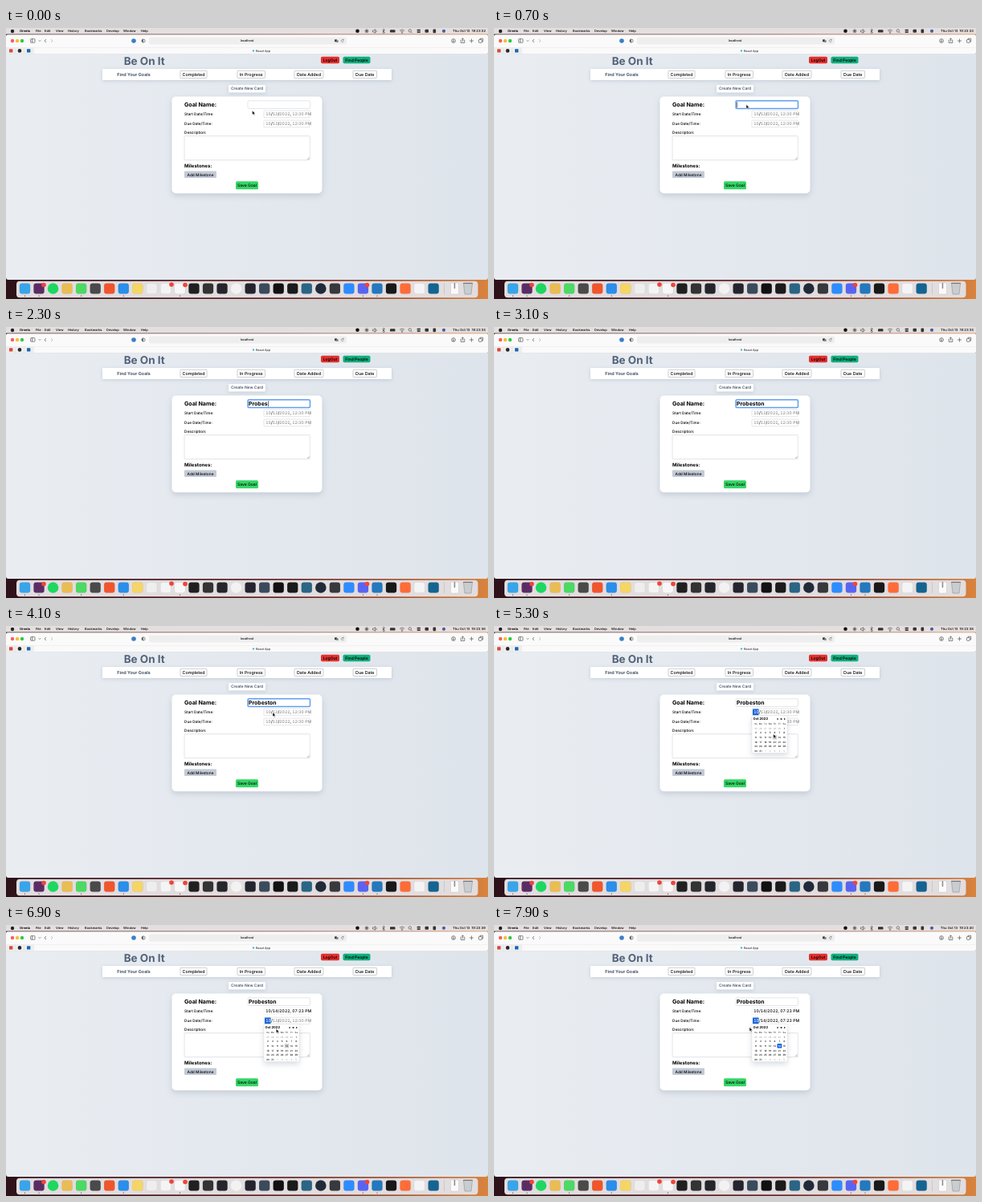
Animation, 600 px wide and 338 px high, one loop 8000 ms. Source, as an HTML page:

```html
<!DOCTYPE html>
<html lang="en">
<head>
<meta charset="utf-8">
<title>Goal form</title>
<style>
  html, body { margin: 0; width: 100%; height: 100%; overflow: hidden; background: #fff; }
  svg { display: block; width: 100vw; height: 100vh; }
  text { font-family: Inter, "Liberation Sans", sans-serif; font-weight: 500; text-rendering: geometricPrecision; white-space: pre; }
  .b { font-weight: 700; }
  .s { font-weight: 600; }
  .c { text-anchor: middle; }
  .e { text-anchor: end; }
  .date { font-feature-settings: "tnum"; }
  .line { fill: none; stroke: #555; stroke-width: .7; }
  .soft { filter: drop-shadow(0 1.5px 2px #64748b40); }
  .card { filter: drop-shadow(0 3px 3.5px #64748b40); }
</style>
</head>
<body>
<svg id="stage" viewBox="0 0 600 338">
  <defs>
    <linearGradient id="sky">
      <stop offset="0" stop-color="#e9edf2"/>
      <stop offset="1" stop-color="#dee4eb"/>
    </linearGradient>
    <linearGradient id="desk">
      <stop offset="0" stop-color="#2d1119"/>
      <stop offset=".6" stop-color="#6d2a2c"/>
      <stop offset="1" stop-color="#d9833f"/>
    </linearGradient>
  </defs>
  <rect width="600" height="338" fill="url(#desk)"/>
  <path d="M0 32H600V311Q600 314 597 314H3Q0 314 0 311Z" fill="url(#sky)"/>
  <g id="chrome"></g>
  <g id="page"></g>
  <g id="dock"></g>

  <g id="nameField">
    <rect id="nameBox" x="301" y="90.8" width="77.5" height="9.7" rx="1.5" fill="#fff"/>
    <text id="nameText" class="b" x="302" y="98.3" font-size="6.9"></text>
    <rect id="caret" y="92.3" width=".6" height="7" fill="#111"/>
  </g>
  <g id="dates"></g>
  <g id="calendar" class="card"></g>
  <path id="cursor" d="M0 0V5.2L1.3 4.1L2.1 6L3 5.6L2.2 3.8H3.8Z" fill="#000" stroke="#fff" stroke-width=".5" stroke-linejoin="round"/>
</svg>
<script>
const $ = id => document.getElementById(id);
const LOOP = 8000, NAME = 'Probeston';

const text = (x, y, size, str, cls = '', fill = '#000') =>
  `<text x="${x}" y="${y}" font-size="${size}" class="${cls}" fill="${fill}">${str}</text>`;
const rect = (x, y, w, h, fill, rx = 0, more = '') =>
  `<rect x="${x}" y="${y}" width="${w}" height="${h}" fill="${fill}" rx="${rx}" ${more}/>`;
const dot = (x, y, r, fill) => `<circle cx="${x}" cy="${y}" r="${r}" fill="${fill}"/>`;
const line = (d, more = '') => `<path class="line" d="${d}" ${more}/>`;
const frame = (x, y, w, h, color = '#d3d6db') =>
  rect(x, y, w, h, '#fff', .8, `stroke="${color}" stroke-width=".6"`);

function drawChrome() {
  const menus = [['File', 37], ['Edit', 48], ['View', 62], ['History', 77], ['Bookmarks', 98],
    ['Develop', 125], ['Window', 146], ['Help', 168]];
  let out = rect(0, 0, 600, 7.6, '#e4dfdf') + dot(8, 4, 2.2, '#222') + text(17, 5.3, 4, 'Orvela', 'b');
  out += menus.map(([label, x]) => text(x, 5.3, 4, label)).join('');
  // status icons
  out += dot(437.5, 3.8, 2.3, '#111');
  out += '<circle cx="449" cy="3.8" r="2" class="line"/>' + dot(449, 3.8, 1, '#222');
  out += line('M456.5 3H457.5L459.5 1.8V6.2L457.5 5H456.5ZM460.7 2.5Q462.2 4 460.7 5.5');
  out += line('M468.5 2.5L471.5 5.5L470 7V1L471.5 2.5L468.5 5.5') + rect(478, 2.2, 6.5, 3.4, '#333', .9);
  out += line('M490 3.2Q493 .8 496 3.2M491.3 4.6Q493 3.2 494.7 4.6') + dot(493, 6, .7, '#222');
  out += '<circle cx="502.8" cy="3.4" r="1.7" class="line"/>' + line('M504.1 4.8L505.5 6.3');
  out += rect(511.5, 1.8, 4.5, 1.7, '#333', .8) + rect(511.5, 4.2, 4.5, 1.7, '#333', .8);
  out += rect(521.5, 1.8, 4.5, 4, '#333', 1) + rect(531.5, 1.6, 3.6, 4.6, '#333', 1) + dot(545, 3.8, 2.1, '#4b5f9a');
  out += '<text id="clock" class="e" x="597" y="5.3" font-size="4.2"></text>';
  // toolbar
  out += rect(0, 8.2, 600, 24, '#fbfafa', 2);
  out += ['#f65f57', '#f8bd32', '#2fc944'].map((c, i) => dot(8 + 6 * i, 16, 2.2, c)).join('');
  out += '<rect x="30.5" y="13.6" width="5.5" height="4.6" rx=".8" class="line"/>' + line('M32.5 13.6V18.2');
  out += line('M40.8 15.3L42 16.5L43.2 15.3M50 14L48 16L50 18') + line('M56 14L58 16L56 18', 'opacity=".45"');
  out += dot(159, 16, 2.8, '#397fc8') + '<circle cx="171" cy="16" r="2.1" class="line"/><path d="M171 13.9A2.1 2.1 0 0 0 171 18.1Z" fill="#666"/>';
  out += rect(178, 11.5, 246, 9, '#efeeee', 2) + text(300, 17.4, 3.8, 'localhost', 'c');
  out += rect(409, 14.2, 3, 3, '#444', .5) + rect(411, 15.2, 2.6, 2.6, '#777', .5);
  out += line('M420 15A1.5 1.5 0 1 0 420.3 16.6M420.2 13.8V15.2H419', 'style="stroke-width:.5"');
  out += '<circle cx="557" cy="16" r="2.4" class="line"/>' + line('M557 14.4V17.4M555.9 16.3L557 17.4L558.1 16.3');
  out += line('M567.3 15H566.2V18.5H570.8V15H569.7M568.5 17V12.8L567.3 14M568.5 12.8L569.7 14');
  out += line('M579.5 13.5V18.5M577 16H582');
  out += '<rect x="588.5" y="14.5" width="3.8" height="3.8" rx=".6" class="line"/>' + line('M590 14.2V13.2H593.7V17H592.5');
  // tabs
  out += rect(0, 24.5, 34, 7.7, '#efeeee') + rect(0, 24.3, 600, .4, '#e2e1e1') + rect(0, 32, 600, .4, '#d9d9db');
  out += [11, 22.5, 34].map(x => rect(x, 24.5, .4, 7.7, '#dbdada')).join('');
  out += rect(4, 26.2, 4.4, 4.4, '#d94b3d', .5) + dot(17, 28.4, 2.3, '#25282c') + rect(26, 26.2, 4.4, 4.4, '#1769b5', .5);
  out += dot(308, 28.4, 1.2, '#45b9d5') + text(311, 29.8, 3.7, 'React App', '', '#333');
  $('chrome').innerHTML = out;
}

function drawPage() {
  const tabs = [['Completed', 217, 33], ['In Progress', 288, 34.5], ['Date Added', 359, 36], ['Due Date', 432, 29.5]];
  let out = text(146.7, 46, 13.5, 'Be On It', 'b', '#526278');
  out += rect(392, 35.7, 23, 8.6, '#e5302e', 1.8) + text(403.5, 41.8, 5, 'LogOut', 'c s');
  out += rect(419.5, 35.7, 34, 8.6, '#10b07c', 1.8) + text(436.5, 41.8, 5, 'Find People', 'c s');
  out += rect(120, 51, 360, 14, '#fff', 1, 'class="soft"') + text(138.3, 60, 5.45, 'Find Your Goals', 'b', '#475569');
  out += tabs.map(([label, x, w]) => frame(x, 53.3, w, 9.2, '#a9aeb6') + text(x + w / 2, 59.9, 5.35, label, 'c')).join('');
  out += rect(277, 71, 46, 9.5, '#fff', 1.2, 'class="soft"') + text(300, 77.4, 4.9, 'Create New Card', 'c s', '#475569');
  out += rect(206.5, 85.5, 187, 120.7, '#fff', 5, 'class="card"');
  out += text(222, 98.4, 7.1, 'Goal Name:', 'b') + text(222, 108.5, 4.7, 'Start Date/Time:');
  out += text(222, 120.6, 4.7, 'Due Date/Time:') + text(222, 132.2, 4.75, 'Description:');
  out += frame(222, 134.7, 156.3, 30, '#cfd2d7') + line('M375 164L377.6 161.4M376.6 164L377.6 163', 'style="stroke-width:.4"');
  out += text(222, 174, 6, 'Milestones:', 'b');
  out += rect(222, 178.5, 40, 8.5, '#c3cad6', 1) + text(242, 184.5, 4.8, 'Add Milestone', 'c');
  out += rect(286, 191.2, 28, 10.1, '#35d566', 1.6) + text(300, 198.2, 5, 'Save Goal', 'c');
  $('page').innerHTML = out;
}

function drawDock() {
  const colors = ('#38a5ea #5b2c64 #1ed760 #e9bd54 #4cd964 #4a4a4a #f0552c #2a8eea #f5d565 #eeeeee #f4f4f4 #f7f7f7 ' +
    '#202020 #333333 #24262b #f2f2f2 #23242e #3a4b5c #111111 #1b1b1b #2a6585 #202a38 #38393d #2d8cff ' +
    '#5865f2 #2478bd #191919 #ff6c37 #f4f4f4 #146491').split(' ');
  const round = [2, 15, 21], running = [0, 1, 4, 7, 11, 24, 25];
  let out = rect(13, 315.8, 574.5, 20.4, '#e2dddf', 4);
  colors.forEach((c, i) => {
    const x = 23.5 + i * 17.54;
    out += round.includes(i) ? dot(x, 325, 6.8, c)
      : rect(x - 6.6, 318.4, 13.2, 13.2, c, 3, 'stroke="#0002" stroke-width=".3"');
    if (running.includes(i)) out += dot(x, 334.1, .6, '#333');
  });
  out += [[47, 320.5], [206, 320], [223, 320.5], [449.5, 320.5]].map(([x, y]) => dot(x, y, 2.8, '#f0443b')).join('');
  out += rect(545.5, 318, .5, 14, '#b6b3b5');
  out += rect(553.5, 318, 10, 14, '#fafafa', 1, 'stroke="#bbb" stroke-width=".4"') + rect(557.7, 318, 1.5, 7, '#8a8a8a');
  out += '<path d="M569.5 318.5H580.5L579 332H571Z" fill="#c9cdd0" stroke="#8d9296" stroke-width=".6"/>' + rect(569, 317.7, 12, 1.4, '#777', .6);
  $('dock').innerHTML = out;
}

function dateField(y, isSet, active) {
  const value = isSet ? '10/14/2022, 07:23 PM' : '10/13/2022, 12:30 PM';
  const ink = isSet ? '#000' : '#8c8c8c';
  const parts = value.replace(/[\/,:]/g, m => `<tspan fill="#111">${m}</tspan>`);
  const shown = active ? `<tspan fill="#fff">10</tspan>${parts.slice(2)}` : parts;
  return frame(321, y - 6.3, 57.3, 8.6, isSet ? '#eceef0' : '#d3d6db') +
    (active ? rect(322, y - 6, 7.6, 8, '#1765d8', .8) : '') + text(323.3, y, 5.1, shown, 'date', ink);
}

function calendar(top, picked) {
  const colX = i => 326 + i * 5.88;
  let out = rect(321, top, 44, 47, '#fff', 1.5, 'stroke="#cfcfcf" stroke-width=".3"');
  out += text(322.5, top + 5.9, 4.1, 'Oct 2022', 'b');
  out += `<path d="M353.7 ${top + 3.3}V${top + 5.7}L351.7 ${top + 4.5}ZM361 ${top + 3.3}V${top + 5.7}L363 ${top + 4.5}Z" fill="#333"/>` + dot(357.6, top + 4.5, 1.1, '#333');
  'Su Mo Tu We Th Fr Sa'.split(' ').forEach((d, i) => { out += text(colX(i), top + 11.5, 2.9, d, 'c', '#444'); });
  for (let i = 0; i < 42; i++) {
    const day = i - 5, inMonth = day > 0 && day < 32;
    const label = day < 1 ? day + 30 : day > 31 ? day - 31 : day;
    const x = colX(i % 7), y = top + 17.2 + Math.floor(i / 7) * 5.65;
    const chosen = picked && day === 14;
    if (chosen) out += rect(x - 2.9, y - 3.9, 5.8, 5.5, '#1765d8', .7);
    else if (!picked && day === 13) out += rect(x - 2.9, y - 3.9, 5.8, 5.5, '#d3d5d8', .7);
    out += text(x, y, 3, label, chosen ? 'c b' : 'c', chosen ? '#fff' : inMonth ? '#111' : '#b0b0b0');
  }
  return out;
}

// time, x, y
const path = [[0, 306.5, 103], [250, 306.5, 103], [600, 314, 95.5], [3500, 314, 95.5], [4050, 332, 107.8],
  [4300, 332, 107.8], [4600, 326, 107], [5250, 347.5, 134.5], [5650, 355, 137.5], [5800, 355, 137.5],
  [6100, 324, 121], [6500, 326, 118.5], [6700, 326, 118.5], [7200, 355, 149.5], [7400, 355, 149.5],
  [7850, 318, 127.5], [8000, 318, 127.5]];

function cursorAt(t) {
  const i = path.findIndex(p => p[0] > t), [t0, x0, y0] = path[i - 1], [t1, x1, y1] = path[i];
  const u = (t - t0) / (t1 - t0), k = u * u * (3 - 2 * u);
  return [x0 + (x1 - x0) * k, y0 + (y1 - y0) * k];
}

let lastState = '';
function render(t) {
  const focus = t >= 600 && t < 4600;
  const typed = Math.max(0, Math.min(NAME.length, Math.floor((t - 950) / 200)));
  const startSet = t >= 5750, dueSet = t >= 7350;
  const startOpen = t >= 4600 && t < 6600, dueOpen = t >= 6600;

  $('clock').textContent = 'Thu Oct 13  19:23:' + Math.floor(32.8 + t / 1000);
  $('nameBox').setAttribute('stroke', focus ? '#5f9ff0' : '#d3d6db');
  $('nameBox').setAttribute('stroke-width', focus ? 1.5 : .6);
  const label = $('nameText');
  label.textContent = NAME.slice(0, typed);
  $('caret').setAttribute('x', 302.4 + (typed ? label.getComputedTextLength() : 0));
  $('caret').style.display = focus && t < 2900 ? '' : 'none';

  const state = [startSet, dueSet, startOpen, dueOpen].join();
  if (state !== lastState) {
    lastState = state;
    $('dates').innerHTML = dateField(109.4, startSet, startOpen) + dateField(121.4, dueSet, dueOpen);
    $('calendar').innerHTML = startOpen ? calendar(111.5, startSet) : dueOpen ? calendar(123.5, dueSet) : '';
  }
  $('cursor').setAttribute('transform', `translate(${cursorAt(t)})`);
  $('cursor').style.display = t >= 1150 && t < 3500 ? 'none' : '';
}

drawChrome();
drawPage();
drawDock();
const begin = performance.now();
function tick() {
  render((performance.now() - begin) % LOOP);
  requestAnimationFrame(tick);
}
tick();
</script>
</body>
</html>
```
